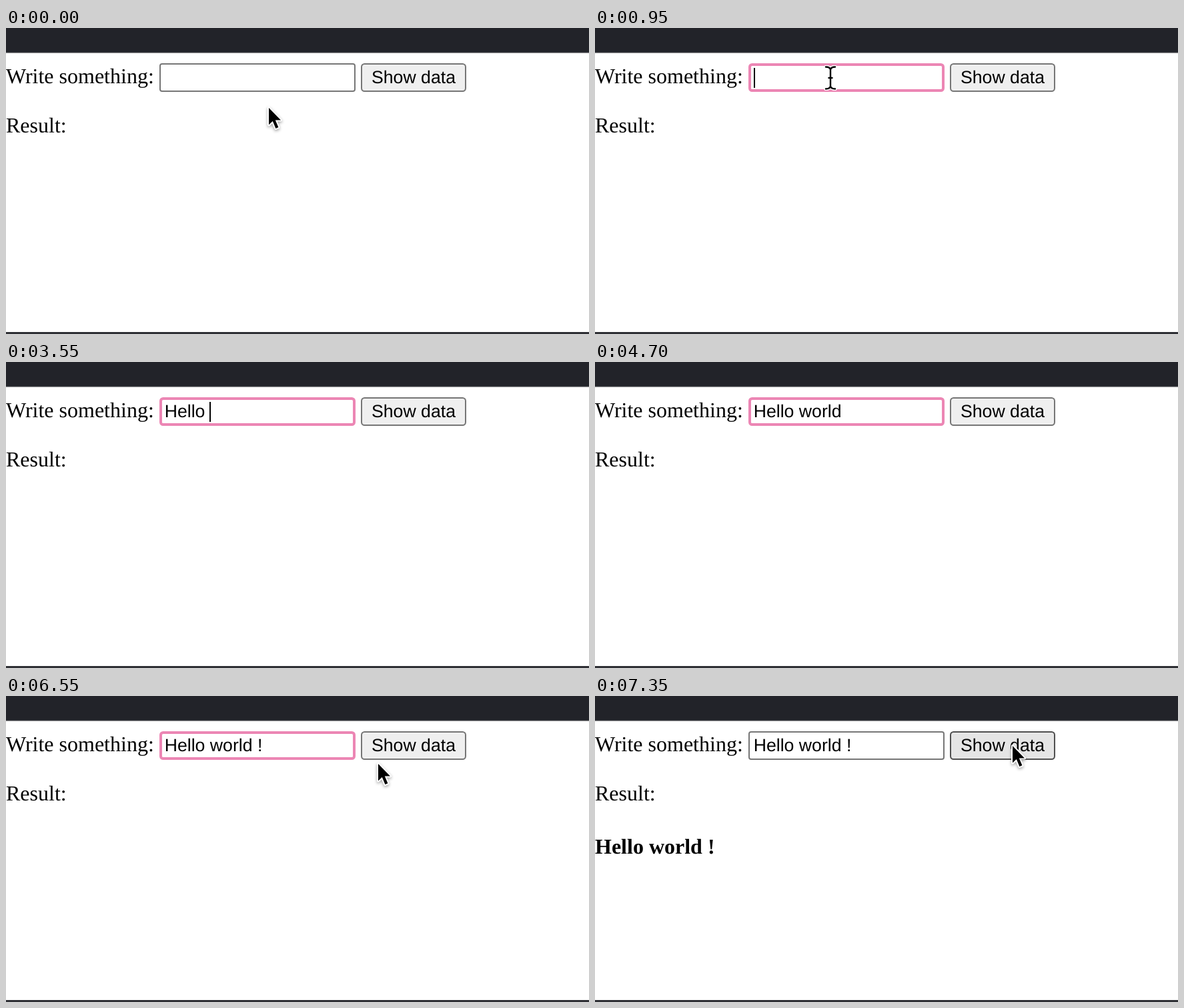
Recreate the animation shown at these times as an HTML page. Size 874 by 460 pixels, loop 8 s.

```html
<!DOCTYPE html>
<html lang="en">
<head>
<meta charset="utf-8">
<title>Show data</title>
<style>
  html, body { margin: 0; width: 100%; height: 100%; overflow: hidden; background: #fff; }
  svg { display: block; width: 100vw; height: 100vh; }
  text { white-space: pre; text-rendering: geometricPrecision; }
  .serif { font: 32px "Liberation Serif", "Times New Roman", serif; }
  .bold { font-weight: bold; }
  .sans { font: 26.667px "Liberation Sans", Arial, sans-serif; }
  #arrow { filter: drop-shadow(0 2px 2px rgba(0, 0, 0, .35)); }
</style>
</head>
<body>
<svg viewBox="0 0 874 460">
  <rect width="874" height="37" fill="#222329"/>
  <rect y="36" width="874" height="1.5" fill="#38393e"/>
  <rect y="457" width="874" height="3" fill="#2f3035"/>

  <text class="serif" y="83">Write something:</text>
  <text class="serif" y="157">Result:</text>
  <text class="serif bold" id="result" y="237">Hello world !</text>

  <rect id="field" fill="#fff"/>
  <text class="sans" id="typed" x="237.7" y="83"></text>
  <rect id="caret" y="60" width="2" height="30"/>

  <rect id="button" x="533" y="54" width="156" height="41" rx="4.5" stroke-width="2"/>
  <text class="sans" x="548" y="83">Show data</text>

  <g id="arrow">
    <path d="M0 0V25.5L5.8 20L10.4 31L14.4 29.3L9.8 18.6H18Z"
      stroke="#fff" stroke-width="4" stroke-linejoin="round" paint-order="stroke"/>
  </g>
  <g id="beam" fill="none" stroke-linecap="round">
    <path id="stem" d="M-7-16.5Q-1-16.5 0-12.5Q1-16.5 7-16.5M-7 16.5Q-1 16.5 0 12.5Q1 16.5 7 16.5M0-12.5V12.5M-2.5 0H2.5"
      stroke="#fff" stroke-width="5"/>
    <use href="#stem"/>
    <path d="M-7-16.5Q-1-16.5 0-12.5Q1-16.5 7-16.5M-7 16.5Q-1 16.5 0 12.5Q1 16.5 7 16.5M0-12.5V12.5M-2.5 0H2.5"
      stroke="#000" stroke-width="2.4"/>
  </g>
</svg>
<script>
const LOOP = 8000, STEP = 50, BLINK = 500;
const TEXT = "Hello world !";
const KEYS = [2150, 2300, 2650, 2850, 3050, 3550, 3600, 3800, 3950, 4050, 4200, 5050, 5800];
const FOCUS = 900, PRESS = 7200, RELEASE = 7300;
const HIDE = KEYS[0], SHOW = 6000;

// time, x, y
const PATH = [
  [0, 394, 120], [250, 390, 106], [450, 381, 82], [600, 379, 74], [650, 379, 74],
  [850, 353, 75], [2000, 353, 75], [SHOW, 353, 75], [6200, 354, 80],
  [6350, 402, 92], [6550, 558, 102], [6700, 617, 81], [6800, 626, 75]
];

const $ = id => document.getElementById(id);
const set = (el, attrs) => { for (const k in attrs) el.setAttribute(k, attrs[k]); };
const show = (el, on) => { el.style.visibility = on ? "visible" : "hidden"; };

function pointAt(t) {
  const i = PATH.findIndex(p => p[0] > t);
  if (i < 0) return PATH[PATH.length - 1].slice(1);
  const a = PATH[i - 1], b = PATH[i], k = (t - a[0]) / (b[0] - a[0]);
  return [a[1] + (b[1] - a[1]) * k, a[2] + (b[2] - a[2]) * k];
}

function drawField(t) {
  const focused = t >= FOCUS && t < PRESS;
  const w = focused ? 4 : 2;
  set($("field"), {
    x: 230 + w / 2, y: 53 + w / 2, width: 294 - w, height: 43 - w,
    rx: focused ? 3.5 : 3, stroke: focused ? "#ec86b4" : "#767676", "stroke-width": w
  });

  const count = KEYS.filter(k => k <= t).length;
  const typed = $("typed");
  typed.textContent = TEXT.slice(0, count);
  const end = count ? Math.floor(237.7 + typed.getComputedTextLength()) : 238;
  const since = t - (count ? KEYS[count - 1] : FOCUS);
  set($("caret"), { x: end });
  show($("caret"), focused && Math.floor(since / BLINK) % 2 === 0);
}

function drawPointer(t) {
  const [x, y] = pointAt(t);
  const inRow = y < 96;
  const beam = t >= 700 && inRow && x < 524;
  const visible = t < HIDE || t >= SHOW;
  for (const id of ["arrow", "beam"]) {
    set($(id), { transform: `translate(${x} ${y})` });
    show($(id), visible && beam === (id === "beam"));
  }
  const hover = inRow && x > 532;
  const down = t >= PRESS && t < RELEASE;
  set($("button"), {
    fill: down ? "#f5f5f5" : hover ? "#e5e5e5" : "#efefef",
    stroke: down ? "#8d8d8d" : hover ? "#4f4f4f" : "#767676"
  });
}

function draw(now) {
  const t = Math.floor((now % LOOP) / STEP) * STEP;
  drawField(t);
  drawPointer(t);
  show($("result"), t >= RELEASE);
}

const start = performance.now();
function tick() {
  draw(performance.now() - start);
  requestAnimationFrame(tick);
}
tick();
</script>
</body>
</html>
```
